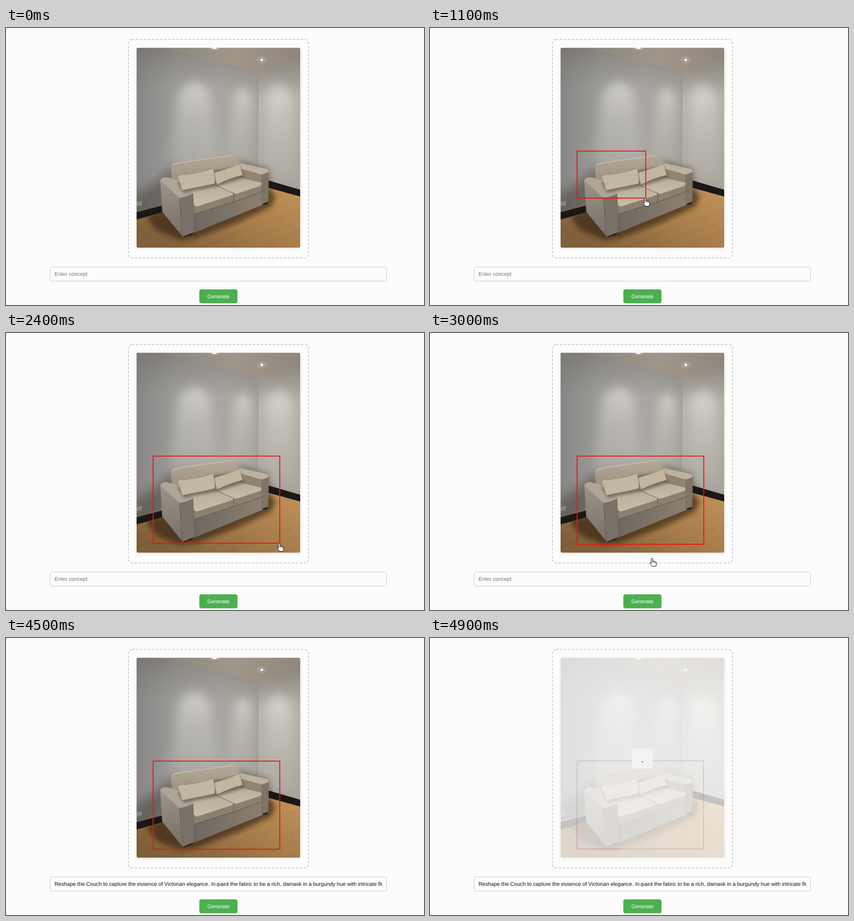
These frames come from a looping animation (800x531 px, 5 s). An HTML page:

```html
<!DOCTYPE html>
<html lang="en">
<head>
<meta charset="utf-8">
<title>Couch concept</title>
<style>
  html, body { margin: 0; width: 100%; height: 100%; overflow: hidden; background: #fcfcfc; }
  svg { display: block; width: 800px; height: 531px; }
  text { font: 10.2px "Liberation Sans", Arial, sans-serif; text-rendering: geometricPrecision; }
</style>
</head>
<body>
<svg viewBox="0 0 800 531">
  <defs>
    <clipPath id="photoClip"><rect x="250" y="38" width="313" height="383" rx="3"/></clipPath>
    <clipPath id="wallClip"><path d="M250 38H300L483 83L563 54V312L503 294L300 341L250 354Z"/></clipPath>
    <clipPath id="floorClip"><path d="M250 367L300 353L503 306L563 323V421H250Z"/></clipPath>
    <clipPath id="fieldClip"><rect x="93" y="460" width="627" height="24"/></clipPath>
    <filter id="soft" x="-60%" y="-60%" width="220%" height="220%"><feGaussianBlur stdDeviation="10"/></filter>
    <filter id="blur2" x="-30%" y="-30%" width="160%" height="160%"><feGaussianBlur stdDeviation="2.5"/></filter>
    <filter id="blur5" x="-30%" y="-30%" width="160%" height="160%"><feGaussianBlur stdDeviation="5"/></filter>
    <linearGradient id="wallL">
      <stop offset="0" stop-color="#868685"/><stop offset=".35" stop-color="#9f9e9b"/>
      <stop offset=".7" stop-color="#a8a6a1"/><stop offset="1" stop-color="#a19d96"/>
    </linearGradient>
    <linearGradient id="wallR" x2="0" y2="1">
      <stop offset="0" stop-color="#9d978d"/><stop offset=".3" stop-color="#b4b0a7"/>
      <stop offset="1" stop-color="#a5a098"/>
    </linearGradient>
    <linearGradient id="dusk" x2="0" y2="1">
      <stop offset="0" stop-color="#6d6860" stop-opacity=".5"/><stop offset=".28" stop-color="#7b7770" stop-opacity="0"/>
    </linearGradient>
    <linearGradient id="beamLight" x2="0" y2="1">
      <stop offset="0" stop-color="#efece4" stop-opacity=".62"/><stop offset=".35" stop-color="#e4e1da" stop-opacity=".36"/>
      <stop offset="1" stop-color="#dedad2" stop-opacity=".08"/>
    </linearGradient>
    <linearGradient id="ceil">
      <stop offset="0" stop-color="#827e77"/><stop offset=".6" stop-color="#a0978a"/><stop offset="1" stop-color="#90867a"/>
    </linearGradient>
    <linearGradient id="wood" y1=".7" x2="1" y2="0">
      <stop offset="0" stop-color="#80603a"/><stop offset=".45" stop-color="#a47a49"/><stop offset="1" stop-color="#c3945a"/>
    </linearGradient>
    <linearGradient id="seat" x2="0" y2="1">
      <stop offset="0" stop-color="#b9ae9b"/><stop offset="1" stop-color="#c8bdaa"/>
    </linearGradient>
    <linearGradient id="base">
      <stop offset="0" stop-color="#6f685f"/><stop offset="1" stop-color="#8a8071"/>
    </linearGradient>
    <linearGradient id="side" x2="0" y2="1">
      <stop offset="0" stop-color="#9d948a"/><stop offset="1" stop-color="#776f67"/>
    </linearGradient>
    <linearGradient id="back" x2="0" y2="1">
      <stop offset="0" stop-color="#b5aa98"/><stop offset="1" stop-color="#978c7b"/>
    </linearGradient>
  </defs>

  <rect x="234.3" y="22" width="344.5" height="418.8" rx="7" fill="none" stroke="#c6c6c6" stroke-width="1.5" stroke-dasharray="4.6 3.1"/>
  <rect x="250" y="39" width="313" height="383" rx="3" opacity=".14" filter="url(#blur2)"/>

  <g clip-path="url(#photoClip)">
    <path fill="url(#ceil)" d="M250 38H563V90H250Z"/>
    <path fill="url(#wallL)" d="M250 38H300L483 83L481 380H250Z"/>
    <path fill="url(#wallR)" d="M483 83L563 54V340H481Z"/>
    <g clip-path="url(#wallClip)">
      <path fill="url(#dusk)" d="M250 38H300L483 83L563 54V340H250Z"/>
      <g filter="url(#soft)" fill="url(#beamLight)">
        <path d="M332 124Q362 84 390 124L408 278H310Z"/>
        <path d="M436 132Q455 98 472 132L478 270H418Z"/>
        <path d="M498 130Q522 88 546 130L556 290H490Z"/>
      </g>
      <path fill="#4d463f" opacity=".6" filter="url(#soft)" d="M240 325L276 303L296 287L322 262L326 300L305 350L240 370Z"/>
      <path fill="#4d463f" opacity=".4" filter="url(#blur5)" d="M442 250L503 268L512 304H480Z"/>
    </g>
    <path d="M483 83L481 268" stroke="#807b73" opacity=".5"/>
    <g fill="#fff">
      <ellipse cx="399" cy="38" rx="10" ry="3" opacity=".4" filter="url(#blur2)"/>
      <ellipse cx="399" cy="38.5" rx="4.5" ry="1.7"/>
      <ellipse cx="489.5" cy="61" rx="7" ry="4" opacity=".4" filter="url(#blur2)"/>
      <ellipse cx="489.5" cy="61" rx="4.6" ry="3" fill="#8b8378"/>
      <ellipse cx="489.5" cy="61" rx="3" ry="2.2"/>
    </g>
    <path d="M250 333L260 331V340L250 342Z" fill="#8a857f" stroke="#6d6862" stroke-width=".6"/>

    <path fill="url(#wood)" d="M250 365L300 351L503 305L563 321V421H250Z"/>
    <path id="planks" clip-path="url(#floorClip)" fill="none" stroke="#5f3f1e" stroke-width=".8" opacity=".22"/>
    <path fill="#1b1715" d="M250 353L300 340V353L250 367ZM501 292L563 310V323L501 306Z"/>
    <path fill="#2e1c0c" opacity=".62" filter="url(#blur5)" clip-path="url(#floorClip)" d="M296 348L268 362L288 388L334 407L365 402L440 374L508 342L516 322L503 306Z"/>

    <g stroke-linejoin="round">
      <path fill="#2b2018" d="M337 396L357 391V396L341 401ZM491 334H502L500 338L492 339Z"/>
      <path fill="url(#back)" d="M316 266Q317 260 326 258L433 243Q441 242 442 249L445 282L335 306L318 288Z"/>
      <path fill="none" stroke="#c9bfaf" stroke-width="1.5" d="M318 264Q320 260 328 259L434 244"/>
      <path fill="#bdb29f" d="M442 263Q445 259 453 260L498 270Q503 271 503 277L490 281L450 289Z"/>
      <path fill="#90846f" d="M444 268L490 281V300L449 289Z"/>
      <path fill="url(#base)" d="M359 351L491 310V339L361 392Z"/>
      <path fill="#8b806f" d="M358 339L436 316V333L360 357ZM436 316L490 298V314L436 333Z"/>
      <path fill="url(#seat)" d="M345 311L400 299L434 314Q438 318 431 321L366 342Q360 342 358 335Z"/>
      <path fill="url(#seat)" d="M400 300L449 287L487 296Q492 299 486 303L440 318Z"/>
      <path fill="none" stroke="#4d453b" opacity=".7" d="M360 357L436 333L490 314M436 317V333M400 301L436 317"/>
      <path fill="#7f7566" d="M490 281L503 276L502 333L490 337Z"/>
      <path fill="url(#side)" d="M295 291L331 325L338 400L299 352Z"/>
      <path fill="#7a7168" d="M331 324L358 317L361 391L338 400Z"/>
      <path fill="#b0a698" d="M295 292Q298 285 308 286L327 291Q351 304 358 317Q348 323 332 326Z"/>
      <path fill="none" stroke="#564f48" stroke-width=".8" opacity=".6" d="M332 326L338 400M358 318L361 391M490 281V337"/>
      <path fill="#53493d" opacity=".6" filter="url(#blur2)" d="M328 296L398 273L446 266L457 287L404 304L340 316Z"/>
      <path fill="#c3b7a3" stroke="#857a6a" stroke-width=".6" d="M328 285Q332 280 345 281Q376 277 396 269Q400 280 400 298Q375 304 337 311Q334 297 328 285Z"/>
      <path fill="#c2b6a0" stroke="#857a6a" stroke-width=".6" d="M399 277Q420 272 447 260Q450 271 453 282Q433 286 404 300Q400 292 399 277Z"/>
    </g>
  </g>

  <rect id="box" x="281.5" y="236" fill="none" stroke="#ee1111" stroke-width="1.7"/>

  <rect id="veil" x="249" y="37" width="315" height="386" fill="#fdfdfd"/>
  <g id="busy">
    <g fill="none" stroke-dasharray="1 1">
      <rect x="281.5" y="235.5" width="242" height="169" stroke="#8f8b8b"/>
      <path d="M281.5 345V404.5H364" stroke="#ff7466" stroke-width="1.3"/>
    </g>
    <rect x="387" y="212" width="39" height="38" fill="#f2f2f2"/>
    <path d="M405 237.3H408.5" stroke="#555" stroke-width="1.2"/>
  </g>

  <rect id="field" x="84.5" y="458" width="644" height="27.3" rx="4" fill="#fcfcfc"/>
  <g clip-path="url(#fieldClip)"><text id="prompt" x="93" y="475"></text></g>
  <path id="caret" d="M93.5 466V477.5" stroke="#111"/>
  <rect x="370" y="501" width="73" height="26.7" rx="4" fill="#4caf50"/>
  <text x="406.5" y="518" fill="#fff" text-anchor="middle">Generate</text>

  <g id="hand" stroke="#111" stroke-linejoin="round" stroke-linecap="round">
    <path fill="#fff" d="M-1.8 1.2Q-1.7-.3-.3-.3T1.2 1.2V6Q1.5 5 2.6 5.2T3.8 6.4Q4.2 5.5 5.2 5.8T6.3 7.1Q7.9 6.3 8.3 8V11Q8 13.5 6.8 15.6H.2Q-1.2 13-3.5 10.5Q-4.8 8.7-3.4 8.1Q-2.6 8-1.8 9.2Z"/>
    <path fill="none" stroke-width=".7" d="M1.2 6V8.5M3.8 6.4V8.7M6.3 7.1V9"/>
  </g>
  <path id="beam" d="M-2.5-5Q-.5-5 0-4Q.5-5 2.5-5M0-4V4M-2.5 5Q-.5 5 0 4Q.5 5 2.5 5" fill="none" stroke="#222"/>
</svg>
<script>
const $ = id => document.getElementById(id);
const LOOP = 5000, STEP = 100;
const HINT = "Enter concept";
const PROMPT = "Reshape the Couch to capture the essence of Victorian elegance. " +
  "In-paint the fabric to be a rich, damask in a burgundy hue with intricate floral";

// time, x, y: each pose holds until the next one
const handPath = [
  [200, 246, 300], [300, 256, 284], [400, 269, 266], [500, 281, 251], [600, 290, 241], [700, 281, 236],
  [800, 298, 249], [900, 336, 277], [1000, 378, 305], [1100, 412, 326],
  [1300, 432, 337], [1400, 456, 351], [1500, 481, 367], [1600, 502, 379], [1700, 516, 387],
  [1900, 517, 389], [2000, 518, 392], [2100, 520, 395], [2200, 521, 398], [2300, 522, 401], [2400, 523, 403],
  [2500, 523, 405], [2700, 516, 408], [2800, 496, 414], [2900, 463, 423], [3000, 425, 432]
];
const beamPath = [[3100, 388, 461], [3200, 368, 467], [3500, 362, 468]];

const hold = (path, t) => path.findLast(p => p[0] <= t);
const show = (id, on) => $(id).setAttribute("visibility", on ? "visible" : "hidden");
const attrs = (id, map) => { for (const k in map) $(id).setAttribute(k, map[k]); };

function place(id, path, t, end) {
  const p = t < end && hold(path, t);
  show(id, p);
  if (p) attrs(id, { transform: `translate(${p[1]} ${p[2]})` });
}

function layPlanks() {
  let d = "";
  for (let i = 0; i < 10; i++) {
    const y = 352 + i * 20;
    d += `M250 ${y + 38}L563 ${y - 84}`;
    const x = 268 + i * 113 % 290;
    d += `M${x} ${y + 38 - (x - 250) * .39}l10 15`;
  }
  attrs("planks", { d });
}

function draw(now) {
  const t = Math.floor(now % LOOP / STEP) * STEP;
  place("hand", handPath, t, 3100);
  place("beam", beamPath, t, 3800);

  const end = hold(handPath, Math.min(t, 2500));
  show("box", t >= 800 && t < 4900);
  if (t >= 800) attrs("box", { width: end[1] + 1 - 281.5, height: end[2] - 236 });

  const focus = t >= 3300 && t < 4500;
  attrs("field", { stroke: focus ? "#111" : "#ccc", "stroke-width": focus ? 1.8 : 1 });
  show("caret", focus && t < 3800);
  const filled = t >= 3800;
  $("prompt").textContent = filled ? PROMPT : HINT;
  attrs("prompt", { fill: filled ? "#111" : "#757575" });

  attrs("veil", { opacity: Math.max(0, (t - 4500) / 400) * .75 });
  show("busy", t >= 4900);
}

function tick() {
  draw(performance.now());
  requestAnimationFrame(tick);
}
layPlanks();
tick();
</script>
</body>
</html>
```
